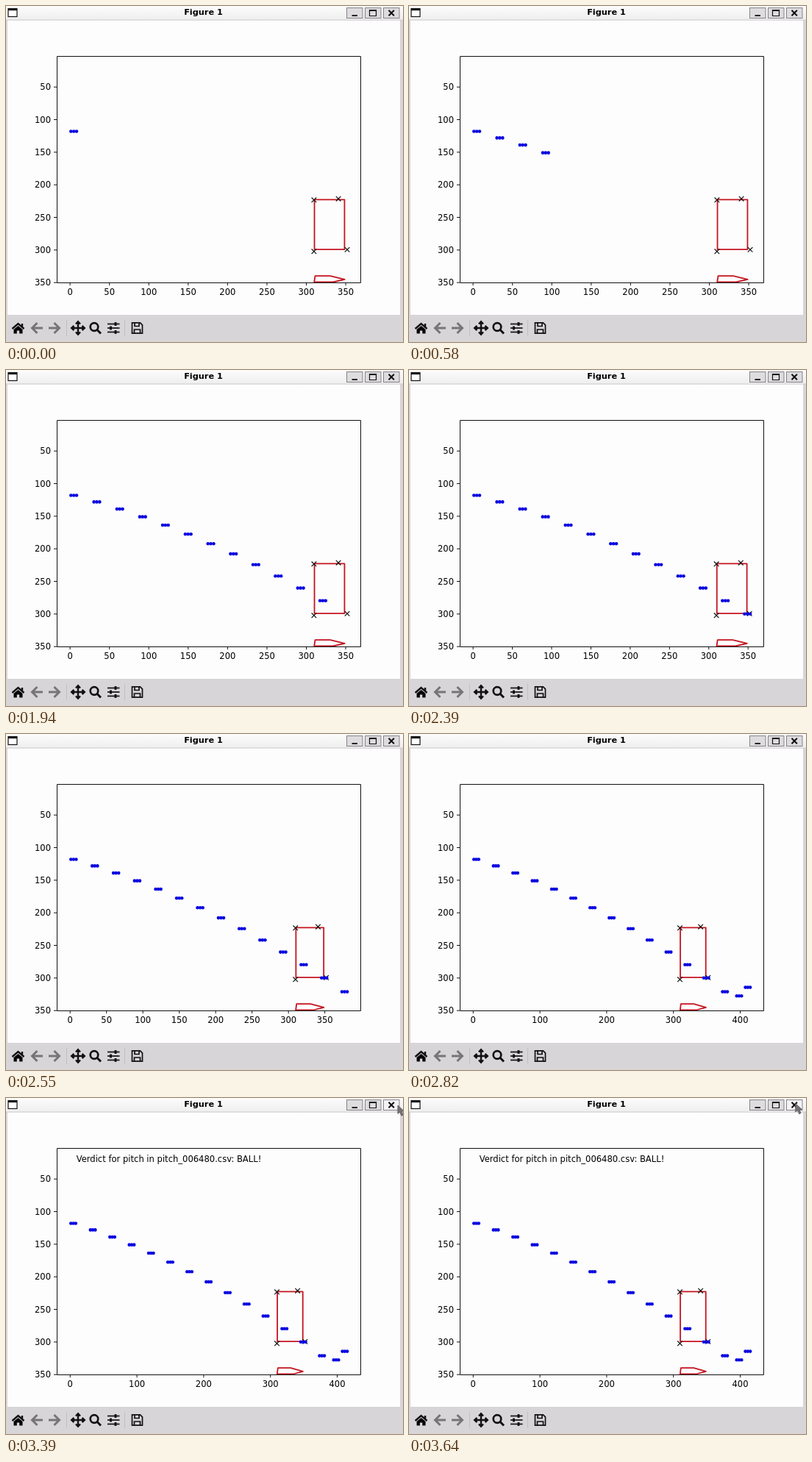
Animation, 540 px wide and 457 px high, one loop 3.67 s. Source, as an HTML page:

```html
<!DOCTYPE html>
<html lang="en">
<head>
<meta charset="utf-8">
<title>Figure 1</title>
<style>
html, body { margin: 0; width: 100%; height: 100%; overflow: hidden; background: #d8d5d8; }
svg { display: block; width: 540px; height: 457px; }
text { font: 11.56px "DejaVu Sans", sans-serif; fill: #000; }
.title { font-weight: bold; font-size: 11.3px; }
.mid { text-anchor: middle; }
.end { text-anchor: end; }
.axis { fill: none; stroke: #111; }
.zone { fill: none; stroke: #c4151f; stroke-width: 1.8; stroke-linejoin: round; }
.mark { fill: none; stroke: #111; stroke-width: 1.2; }
.dot { fill: #0a08e0; }
.face { fill: #dedcde; stroke: #858285; }
.icon { fill: none; stroke: #111; stroke-width: 2.4; }
</style>
</head>
<body>
<svg viewBox="0 0 540 457">
  <defs>
    <linearGradient id="bar" x2="0" y2="1">
      <stop stop-color="#fdfcfd"/><stop offset="1" stop-color="#efeeef"/>
    </linearGradient>
    <path id="arrow" d="M42.5 431l-7 7 7 7M36 438h14"/>
    <path id="arm" d="M0 0v-7M-3 -5.500l3 -3.300 3 3.300"/>
  </defs>

  <!-- window -->
  <rect width="540" height="457" fill="#d8d5d8"/>
  <rect width="540" height="19" fill="url(#bar)"/>
  <rect y="18.5" width="540" height="1.2" fill="#d0ced0"/>
  <rect x="2" y="19.7" width="534" height="400.3" fill="#fefdfe"/>
  <rect x="3" y="3.5" width="12" height="11" fill="#fff" stroke="#111" stroke-width="1.2"/>
  <rect x="3" y="3.5" width="12" height="2.6" fill="#111"/>
  <text class="title mid" x="268.5" y="12.3">Figure 1</text>
  <rect class="face" x="463.5" y="2.5" width="21.5" height="14"/>
  <rect class="face" x="488.5" y="2.5" width="21.5" height="14"/>
  <rect class="face" x="513.5" y="2.5" width="21.5" height="14" id="close"/>
  <g fill="none" stroke="#111">
    <path d="M470.5 13h7.500" stroke-width="1.8"/>
    <path d="M494.5 5.5h9v8h-9zM494.5 6.3h9" stroke-width="1.2"/>
    <path d="M520.5 5.7l7.4 7.6m0-7.6l-7.4 7.6" stroke-width="2"/>
  </g>

  <!-- toolbar -->
  <path d="M82.5 427v22M161.500 427v22" stroke="#c2bfc2"/>
  <path class="icon" d="M8.500 439l8-7 8 7M22 432v4"/>
  <path d="M10.500 440l6-5 6 5v5.500h-4.300v-4h-3.400v4h-4.300z"/>
  <g class="icon" style="stroke:#777577;stroke-width:3">
    <use href="#arrow"/><use href="#arrow" transform="matrix(-1 0 0 1 108 0)"/>
  </g>
  <g class="icon" id="move"></g>
  <circle class="icon" cx="120" cy="436.500" r="5.300" style="stroke-width:2.700"/>
  <path class="icon" d="M124 440.500l5 5" style="stroke-width:3"/>
  <g class="icon" id="sliders"></g>
  <path class="icon" d="M171.500 430.800h11l3 3v11.400h-14zM174.500 445v-5h8v5M175 431v4.500h6v-4.500" style="stroke-width:1.700"/>

  <g id="plot" transform="translate(.4 .2)"></g>
  <path class="axis" d="M69.500 68.500h413V376.500h-413z"/>
  <g id="yTicks"></g>
  <text id="verdict" x="95.700" y="87.400">Verdict for pitch in pitch_006480.csv: BALL!</text>
  <path id="resize" d="M527 9.500l8 6.500M529 17h7v-7M538 8.500v12" fill="none" stroke="#858285" stroke-width="2"/>
  <path id="pointer" d="M0 0v11.5l2.7-2.3 2.3 5 2.4-1.1-2.3-4.9 3.6-.2z" fill="#757275" stroke="#5a585a" stroke-width=".8"/>
</svg>
<script>
const LOOP = 3670, LEFT = 69, WIDTH = 413.5, HALF = 3.6;
const VERDICT = 2980, RESIZE = 3090, POINTER = 3390;
const SIGHTINGS = 16, BOUNCE = 13;
const PAUSES = { 8: 182, 11: 156, 12: 100 }; // extra wait after a sighting, ms

const ZONE = { x0: 310.3, x1: 348.5, y0: 263.2, y1: 331 };
const PLATE = [[311.2, 367], [330.4, 367], [348.7, 371.6], [334, 375.3], [310, 375.3]];
const MARKS = [[309.7, 263.6], [340.7, 262], [351.9, 331.2], [309.7, 333.6]];

const $ = id => document.getElementById(id);
const show = (el, on) => el.setAttribute("visibility", on ? "visible" : "hidden");
const range = n => [...Array(n).keys()];

// Falling arc in data x and stage y, then a straight rebound
function ballAt(k) {
  const up = k - BOUNCE;
  return up > 0
    ? { x: 385.4 + 13 * up, y: 367.6 - 11.6 * up }
    : { x: 4.7 + 29.3 * k - 0.05 * k * k, y: 170.3 + 8.47 * k + 0.414 * k * k };
}

function timeOf(k) {
  let t = 158.5 * k;
  for (const after in PAUSES) if (k > after) t += PAUSES[after];
  return t;
}

function drawPlot(count) {
  const balls = range(count).map(ballAt);
  const max = Math.max(351.9, ...balls.map(b => b.x + HALF));
  const span = (max - 1) * 1.1;
  const min = 1 - (max - 1) * 0.05;
  const px = x => LEFT + (x - min) / span * WIDTH;
  const poly = pts => `<polygon class="zone" points="${pts.map(([x, y]) => px(x) + "," + y).join(" ")}"/>`;

  let out = "";
  const step = span / 9 > 50 ? 100 : 50;
  for (let v = 0; v < min + span; v += step) {
    out += `<path class="axis" d="M${px(v)} 376v4"/><text class="mid" x="${px(v)}" y="393.1">${v}</text>`;
  }
  const { x0, x1, y0, y1 } = ZONE;
  out += poly([[x0, y0], [x1, y0], [x1, y1], [x0, y1]]) + poly(PLATE);
  for (const [x, y] of MARKS) {
    out += `<path class="mark" d="M${px(x) - 3.3} ${y - 3.3}l6.6 6.6m0-6.6l-6.6 6.6"/>`;
  }
  for (const { x, y } of balls) {
    for (const d of [-HALF, 0, HALF]) out += `<circle class="dot" cx="${px(x + d)}" cy="${y}" r="2.3"/>`;
  }
  $("plot").innerHTML = out;
}

$("move").innerHTML = range(4).map(i =>
  `<use href="#arm" transform="translate(98 438) rotate(${i * 90})"/>`).join("");

$("sliders").innerHTML = range(3).map(i => {
  const y = 432.5 + 5.5 * i, knob = i === 1 ? 142.5 : 149;
  return `<path d="M138 ${y}h16.5" stroke-width="1.7"/><path d="M${knob} ${y - 2.4}v4.8" stroke-width="3"/>`;
}).join("");

$("yTicks").innerHTML = range(7).map(i => {
  const y = 110.2 + i * 266 / 6;
  return `<path class="axis" d="M65 ${y}h4"/><text class="end" x="61" y="${y + 4}">${50 * (i + 1)}</text>`;
}).join("");

let drawn = 0;
function render(t) {
  const count = range(SIGHTINGS).filter(k => timeOf(k) <= t).length;
  if (count !== drawn) drawPlot(drawn = count);
  show($("verdict"), t >= VERDICT);
  show($("resize"), t >= RESIZE && t < POINTER);
  show($("pointer"), t >= POINTER);
  $("close").style.fill = t >= RESIZE ? "#f4f3f4" : "";
  const k = Math.min(1, Math.max(0, (t - POINTER) / 220));
  const ease = 1 - (1 - k) ** 2;
  $("pointer").setAttribute("transform", `translate(${533 - 7.3 * ease} ${10 - 2.5 * ease})`);
}

const start = performance.now();
function tick() {
  render((performance.now() - start) % LOOP);
  requestAnimationFrame(tick);
}
tick();
</script>
</body>
</html>
```
